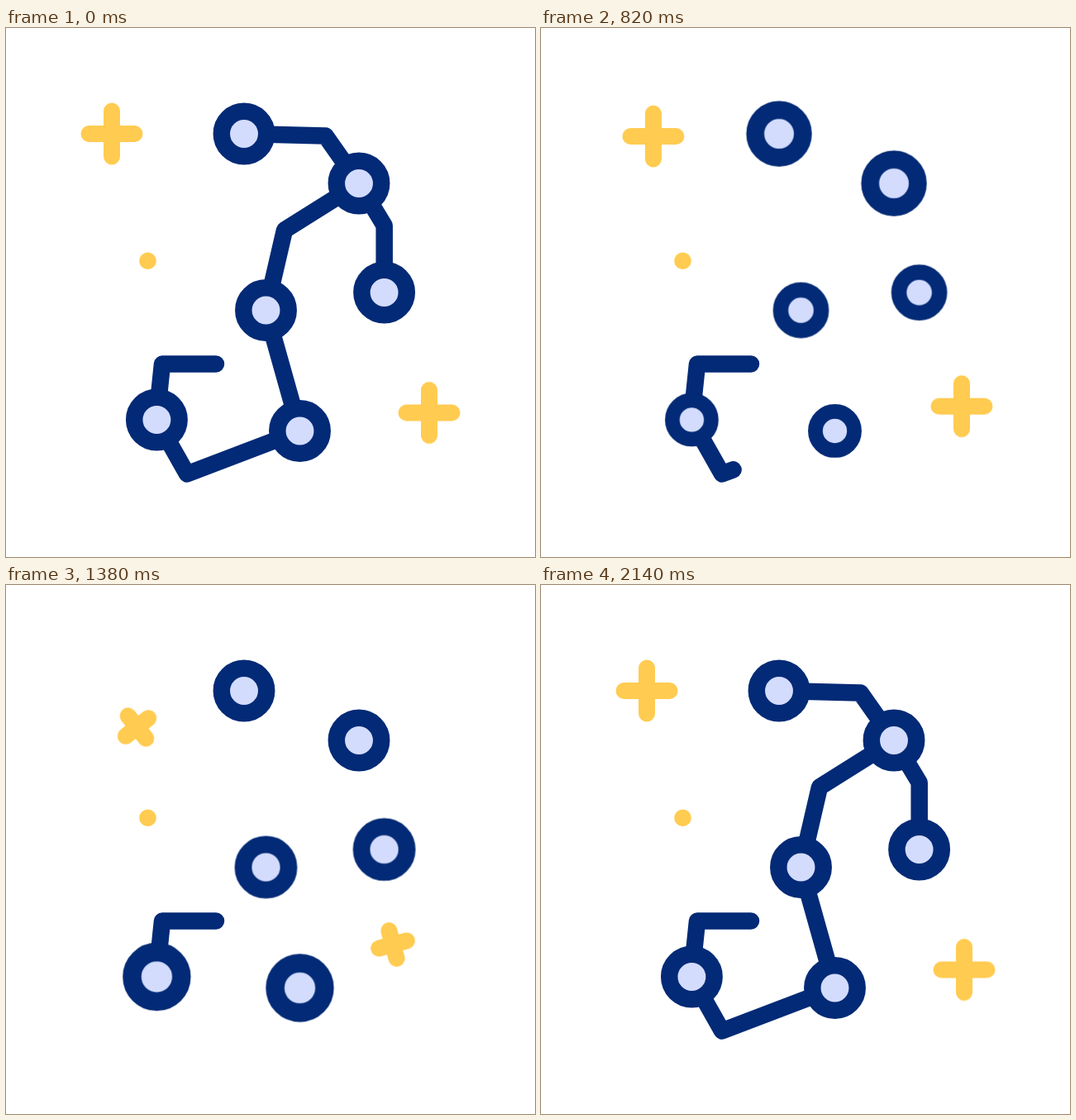
These frames come from a looping animation (640 px wide and 640 px high, 2.4 s). An HTML page:

```html
<!DOCTYPE html>
<html lang="en">
<head>
<meta charset="utf-8">
<title>Constellation</title>
<style>
  html, body { margin: 0; width: 100%; height: 100%; overflow: hidden; background: #fff; }
  svg { display: block; width: 100%; height: 100%; }
  svg * { animation: 2400ms linear infinite; }

  .link, .plus path { fill: none; stroke-width: 20.5; stroke-linecap: round; stroke-linejoin: round; }
  .link { stroke: #032a76; stroke-dasharray: 1 2; }
  .body { animation-name: trim-body; }
  .branch { animation-name: trim-branch; }
  @keyframes trim-body {
    0%, 5.42% { stroke-dashoffset: 0; }
    43.95% { stroke-dashoffset: 1; opacity: 1; }
    43.96%, 51.8% { opacity: 0; }
    51.67% { stroke-dashoffset: 1; }
    51.81% { opacity: 1; }
    87.5%, 100% { stroke-dashoffset: 0; }
  }
  @keyframes trim-branch {
    0%, 5.42% { stroke-dashoffset: 0; }
    12.83% { stroke-dashoffset: 1; opacity: 1; }
    12.84%, 80.6% { stroke-dashoffset: 1; opacity: 0; }
    80.61% { opacity: 1; }
    87.5%, 100% { stroke-dashoffset: 0; }
  }

  .star { fill: #d3dcfd; stroke: #032a76; stroke-width: 20.5; animation-name: pulse;
    animation-timing-function: ease-in-out; transform-box: fill-box; transform-origin: center; }
  .mid { animation-delay: 200ms; }
  .low { animation-delay: 440ms; }
  @keyframes pulse {
    0%, 4.4% { transform: scale(1); }
    19.2% { transform: scale(.85); }
    40% { transform: scale(1.1); }
    52.1%, 100% { transform: scale(1); }
  }

  .plus { --turn: -138deg; offset-path: path("M128 128Q154 135 158.5 172"); offset-rotate: 0deg;
    animation-name: drift; animation-timing-function: cubic-bezier(.333, 0, .667, 1); }
  .right { --turn: 177deg; offset-path: path("M512 465.5Q505 439.5 468 435"); }
  .plus g { animation-name: spin; animation-timing-function: ease-in-out; }
  .plus path { stroke: #ffcb50; stroke-width: 20; animation-name: shrink; animation-timing-function: ease-in-out; }
  @keyframes drift {
    0%, 27.5% { offset-distance: 0%; }
    55.4%, 60.1% { offset-distance: 100%; }
    81.4%, 100% { offset-distance: 0%; }
  }
  @keyframes spin {
    0%, 37.5% { transform: rotate(0deg); }
    62.1% { transform: rotate(var(--turn)); }
    85.8%, 100% { transform: rotate(0deg); }
  }
  @keyframes shrink {
    0%, 39.6% { d: path("M-27.5 0L27.5 0M0 -27.5L0 27.5"); }
    53.7%, 57.5% { d: path("M-17.5 0L17.5 0M0 -17.5L0 17.5"); }
    85.8%, 100% { d: path("M-27.5 0L27.5 0M0 -27.5L0 27.5"); }
  }

  .blink { fill: #032a76; opacity: 0; animation-name: blink; animation-timing-function: step-end; }
  @keyframes blink {
    0%, 33.7%, 82%, 100% { opacity: 0; }
    13.3%, 58% { opacity: 1; }
  }
</style>
</head>
<body>
<svg viewBox="0 0 640 640">
  <g class="plus"><g><path d="M-27.5 0L27.5 0M0 -27.5L0 27.5"/></g></g>
  <g class="plus right"><g><path d="M-27.5 0L27.5 0M0 -27.5L0 27.5"/></g></g>

  <circle cx="171.5" cy="281.7" r="10.3" fill="#ffcb50"/>
  <circle class="blink" cx="171.5" cy="281.7" r="11.5"/>

  <path class="link body" pathLength="1"
    d="M254 406.5H189L182 474L219 539.5L355.5 487.5L314.5 341.5L337 244.5L427 188L386.5 130.5L288 128"/>
  <path class="link branch" pathLength="1" d="M427 188L457.7 239V320"/>

  <circle class="star" cx="288" cy="128" r="27.2"/>
  <circle class="star" cx="427" cy="188" r="27.2"/>
  <circle class="star mid" cx="457.6" cy="320" r="27.2"/>
  <circle class="star mid" cx="314.5" cy="341.5" r="27.2"/>
  <circle class="star low" cx="355.5" cy="487.5" r="27.2"/>
  <circle class="star low" cx="182.4" cy="474" r="27.2"/>
</svg>
</body>
</html>
```
